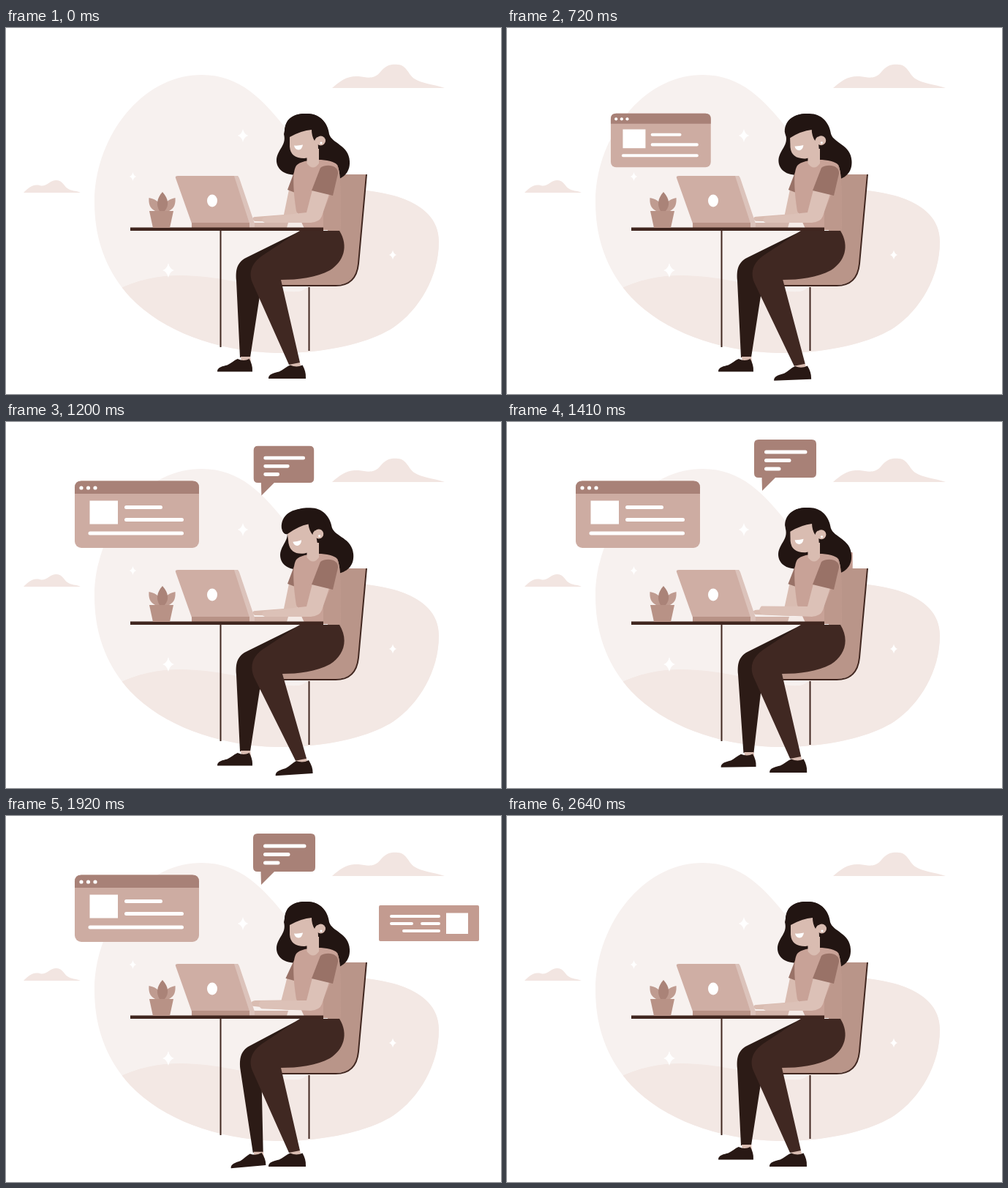
These frames come from a looping animation (677 by 500 pixels, 2.7 s). An HTML page:

```html
<!DOCTYPE html>
<html lang="en">
<head>
<meta charset="utf-8">
<title>Working at a desk</title>
<style>
html, body { margin: 0; width: 100%; height: 100%; overflow: hidden; background: #fff; }
svg { display: block; width: 100%; height: 100%; }
.w { fill: #fff; }
.line { fill: none; stroke: #fff; stroke-width: 5; stroke-linecap: round; }
.thin { stroke-width: 4; }
.edge { fill: none; stroke: #40261f; stroke-width: 2; }
.skin { fill: #d9bcb1; }
.hair { fill: #221512; }
.front { fill: #402822; }
.back { fill: #2c1b16; }
.shoe { fill: #281814; }
.sleeve { fill: #997267; }
</style>
</head>
<body>
<svg viewBox="0 0 677 500">
  <defs>
    <clipPath id="clip"><path id="blob" d="M121 238C121 150 185 64 268 64C320 64 352 98 385 140C425 192 455 217 500 223C555 230 592 252 592 292C592 340 565 385 530 409C490 435 420 445 370 444C290 442 215 415 170 368C135 330 121 285 121 238Z"/></clipPath>
    <path id="star" d="M0-1Q.18-.18.8 0Q.18.18 0 1Q-.18.18-.8 0Q-.18-.18 0-1Z"/>
    <path id="shoe" d="M-25.500 9.500C-26 3 -17 1.500 -11 0C-6-2-1-7 4-9Q13-5 21-9Q26 0 25.500 8V9.500Z"/>
    <filter id="blur" x="-30%" y="-30%" width="160%" height="160%"><feGaussianBlur id="soft" stdDeviation="0"/></filter>
  </defs>

  <use href="#blob" fill="#f7f1ef"/>
  <path clip-path="url(#clip)" fill="#f3e8e4" d="M150 359C185 340 225 336 260 339C320 343 360 362 400 360C440 355 440 235 490 222L600 200V460H150Z"/>
  <path fill="#f2e5e1" d="M446 82C457 72 467 65 482 66C495 68 504 70 512 60C520 50 528 49 536 50C548 51 550 63 558 69C568 76 585 77 600 82ZM24 225C31 218 37 213 46 215C55 218 58 209 68 208C78 208 79 216 84 219C89 223 96 222 102 225Z"/>
  <g class="w">
    <use href="#star" transform="translate(324 147) scale(9)"/>
    <use href="#star" transform="translate(173.500 203) scale(6)"/>
    <use href="#star" transform="translate(222 331) scale(10)"/>
    <use href="#star" transform="translate(529 310) scale(6.500)"/>
  </g>

  <g id="page">
    <rect x="94" y="80.500" width="170" height="91.500" rx="9" fill="#cdaca2"/>
    <path fill="#a88177" d="M94 98V89.500Q94 80.500 103 80.500H255Q264 80.500 264 89.500V98Z"/>
    <g class="w"><circle cx="103" cy="90" r="2.600"/><circle cx="112.500" cy="90" r="2.600"/><circle cx="122" cy="90" r="2.600"/><path d="M114.500 107.500H153V139.500H114.500Z"/></g>
    <path class="line" d="M164.500 116.500H211.500M164.500 133.500H240.500M115 152H240.500"/>
  </g>
  <g id="bubble">
    <path fill="#a88177" d="M344 24H417Q423 24 423 30V70Q423 76 417 76H367L349 94L348.500 76H344Q338 76 338 70V30Q338 24 344 24Z"/>
    <path class="line" d="M354.500 41H408M354.500 52.500H386M354.500 64H372"/>
  </g>
  <g id="banner">
    <rect x="510" y="122" width="137" height="49" rx="2" fill="#c39b90"/>
    <path class="w" d="M602 132.500H632V161H602Z"/>
    <path class="line thin" d="M527 137H592M527 147H555M569 147H592M544 157H592"/>
  </g>

  <path fill="#b99589" d="M440 200H493L482 322Q479 351 451 351H372V330H440Z"/>
  <path class="edge" d="M493 200L482 322Q479 352 451 352H374M414.500 354V441M293.500 277V436"/>

  <path id="backLeg" class="back"/>
  <path id="backAnkle" class="skin"/>
  <use id="backShoe" class="shoe" href="#shoe"/>
  <path id="frontAnkle" class="skin"/>
  <path id="frontLeg" class="front"/>
  <use id="frontShoe" class="shoe" href="#shoe"/>

  <path id="backHair" class="hair" d="M382 135C384 121 398 116 412 117C430 117 440 130 442 145C446 158 469 160 470 182C471 199 459 207 447 208L402 200C380 203 369 192 370 179C372 165 384 160 380 145Z"/>
  <path fill="#d3b5ab" d="M333 266H386V273H333Z"/>
  <path fill="#f5ebe7" d="M386 266H405L408 273H384Z"/>
  <path id="farArm" class="skin"/>
  <path id="farSleeve" class="sleeve"/>
  <path fill="#c8a297" d="M397 188C405 178 445 177 453 187C460 202 456 240 458 276H409L397 250C393 225 391 197 397 188Z"/>
  <path fill="#bd988c" d="M453 187C460 202 456 240 458 276H434V250L447 220Z"/>
  <path class="skin" d="M411.500 165H428V185Q420 196 411.500 185Z"/>
  <g id="head">
    <path class="skin" d="M388 138V162Q389 178 408 178Q422 177 427 165L426 138Z"/>
    <path class="hair" d="M381 140C382 122 398 116 412 117C432 118 442 132 441 150L432 148Q424 147 422 154Q418 148 418 139Q404 140 388 149Q382 150 381 140Z"/>
    <circle class="skin" cx="430.500" cy="154" r="6.500"/>
    <circle class="w" cx="431" cy="157" r="1.500"/>
    <path class="w" d="M394 160.500Q400 161 406 159.500Q405 166 400 166.500Q395 166 394 160.500Z"/>
  </g>
  <path id="nearArm" fill="#dcc1b7"/>
  <path class="sleeve" d="M430 191C438 185 455 187 454 199L447 229L418 222Z"/>

  <path fill="#cfaea4" d="M235 202H317L339 267H254L232 205Q231 202 235 202Z"/>
  <path fill="#dcc3bb" d="M312 202H316Q318 202 319 205L340 267V272H333V267Z"/>
  <path fill="#b89286" d="M254 266H333V273H254Z"/>
  <ellipse class="w" cx="282" cy="236" rx="7" ry="8.500"/>
  <path fill="#40261f" d="M170 272.500H434V277H170Z"/>

  <path fill="#bf9b90" d="M214 250H204C196 246 195 239 195.500 232C207 234 212 240 214 250ZM213 250H223C231 246 232 239 231.500 232C221 234 215 240 213 250Z"/>
  <path fill="#aa8378" d="M214 224C223 234 223 243 217 250H210C205 242 206 233 214 224Z"/>
  <path fill="#b89286" d="M196 250H229L224 273H201Z"/>
</svg>
<script>
const LOOP = 2700, OUT = 2340, OUT_MS = 300;
const el = {};
document.querySelectorAll('svg [id]').forEach(e => el[e.id] = e);

const clamp = v => Math.max(0, Math.min(1, v));
const ramp = (t, a, b) => { const u = clamp((t - a) / (b - a)); return u * u * (3 - 2 * u); };
const hump = (t, start, ms) => Math.sin(Math.PI * clamp((t - start) / ms)) ** 2;
const beat = (t, at, period) => Math.cos(Math.PI * (t - at) / period) ** 8;
const quad = (a, b, c, p) => (1 - p) * (1 - p) * a + 2 * p * (1 - p) * b + p * p * c;
const path = (id, d) => el[id].setAttribute('d', d);
const move = (id, v) => el[id].setAttribute('transform', v);

// Each panel flies from behind the laptop along from -> via -> to.
const panels = [
  { id: 'page', start: 580, ms: 390, from: [295, 218], via: [240, 181], to: [179, 126.25], size: .25 },
  { id: 'bubble', start: 1008, ms: 300, from: [300, 228], via: [376, 143], to: [380.5, 59], size: .35 },
  { id: 'banner', start: 1313, ms: 490, from: [300, 234], via: [439, 190], to: [578.5, 146.5], size: .1 }
];

function drawPanel(o, t) {
  const p = t < OUT
    ? 1 - (1 - clamp((t - o.start) / o.ms)) ** 3
    : 1 - clamp((t - OUT) / OUT_MS) ** 3;
  const [x, y] = [0, 1].map(i => quad(o.from[i], o.via[i], o.to[i], p));
  const s = o.size + (1 - o.size) * p;
  el[o.id].style.display = p > 0 ? '' : 'none';
  move(o.id, `translate(${x} ${y}) scale(${s}) translate(${-o.to[0]} ${-o.to[1]})`);
  return p;
}

function drawLegs(t) {
  const f = 16.5 * hump(t, 540, 900), fy = f * .3, fk = f * .22;
  path('frontLeg', `M402 277H456C469 298 462 319 443 331C424 341 400 344 ${376 + fk} 344L${402 + f} ${457 + fy}L${387 + f} ${460 + fy}L${337 + fk} 348C${330 + fk} 330 340 318 352 310Z`);
  path('frontAnkle', `M${388 + f} ${457 + fy}h14l2 8h-14Z`);
  move('frontShoe', `translate(${384.5 + f} ${469.5 + fy}) rotate(${-f * .4})`);

  const b = 19 * hump(t, 1250, 1150), by = b * .55, bk = b * .3;
  path('backLeg', `M405 276L${328 + bk} 314C${315 + bk} 321 ${314 + bk} 332 ${315 + bk} 345L${320 + b} ${450 + by}H${334 + b}L${347 + bk * .5} 366L400 300Z`);
  path('backAnkle', `M${321 + b} ${449 + by}h13l1 7h-13Z`);
  move('backShoe', `translate(${313 + b} ${460.5 + by}) rotate(${-b * .3}) scale(.94)`);
}

function drawArms(t) {
  const a = beat(t, 150, 450), n = beat(t, 330, 540);
  path('farSleeve', `M394 197L${385 - 3 * a} ${221 + a}L398 226V197Z`);
  path('farArm', `M${387 - 3 * a} 221L398 224V262Q393 265 386 265L${340 - 3 * a} ${264 - 5 * a}Q${334 - 2 * a} ${259 - 7 * a} 341 ${258 - 7 * a}L${380 - 4 * a} ${255 - 4 * a}Z`);
  path('nearArm', `M419 221L442 227L432 257Q429 265 417 266L${354 - 5 * n} ${266 - 3 * n}Q${347 - 5 * n} ${263 - 5 * n} ${353 - 5 * n} ${258.5 - 7 * n}L411 252Z`);
}

function draw(t) {
  const page = panels.map(o => drawPanel(o, t))[0];
  const speed = page > 0 && page < .9 ? 3.5 * (1 - page) ** 2 : 0;
  el.soft.setAttribute('stdDeviation', speed);
  if (speed) el.page.setAttribute('filter', 'url(#blur)');
  else el.page.removeAttribute('filter');

  const tilt = ramp(t, 640, 870) - ramp(t, 1200, 1500);
  move('head', `rotate(${-7 * tilt} 420 176)`);
  move('backHair', `translate(${4 * tilt} 0) rotate(${-2 * tilt} 420 150)`);
  drawLegs(t);
  drawArms(t);
}

const begin = performance.now();
function tick() {
  draw((performance.now() - begin) % LOOP);
  requestAnimationFrame(tick);
}
tick();
</script>
</body>
</html>
```
